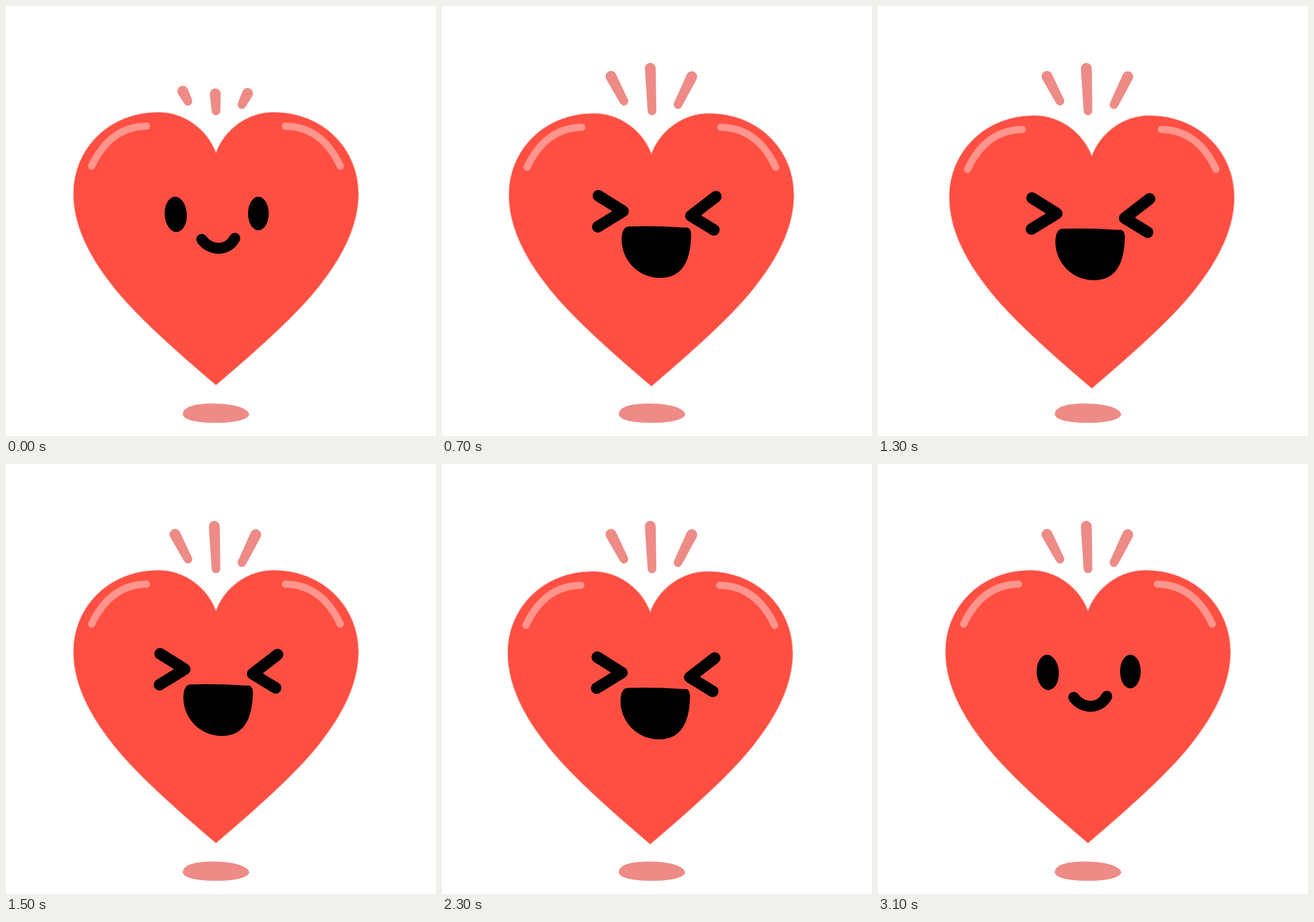
An HTML page with a canvas that plays this animation: 748 px wide and 748 px high, repeating every 3200 ms.

```html
<!DOCTYPE html>
<html lang="en">
<head>
<meta charset="utf-8">
<title>Laughing heart</title>
<style>
  html, body { margin: 0; width: 100%; height: 100%; overflow: hidden; background: #fff; }
  canvas { display: block; }
</style>
</head>
<body>
<canvas id="stage" width="748" height="748"></canvas>
<script>
const ctx = document.getElementById('stage').getContext('2d');
ctx.lineCap = ctx.lineJoin = 'round';

const STEP = 100, STEPS = 32;
const LAUGH_START = 3, LAUGH_END = 27, SHAKE_STEPS = 12;
const RED = '#ff4f42', PINK = '#ee8b86', SHINE = '#ff958c', EDGE = '#f5aaa4', BLACK = '#000';

// Left half, with a straight overlap past the axis to hide the seam
const halfHeart = new Path2D(`M365.2 257 C350 215 310 185.5 265 185.5 C180 185.5 118 248 118 327
  C118 385 150 440 181 480 C220 533 300 603 365.2 658.5 L380 600 L380 300 Z`);
const halfShine = new Path2D('M244.5 209 Q181 210 149 278.5');
const heart = mirrored(halfHeart);
const shines = mirrored(halfShine);
const smile = new Path2D('M340.5 406 C356 427 386 427 398 404');
const squint = new Path2D('M268 330 L311 357 L267 384 M472.5 331.5 L429 365 L469 389.5');
const laugh = new Path2D(`M308.5 406 Q309 384 321 383.5 Q365 382 418 385.5 Q429 383 429.5 398
  Q428 473 376 473 C336 473 308.5 441 308.5 406`);
const shadow = new Path2D(`M307.5 709 C310 696 330 691.5 362 691.5 C400 692 420 700 423 710
  C422 719 400 725 366 725 C330 725 307 720 307.5 709`);

function mirrored(half) {
  const whole = new Path2D(half);
  whole.addPath(half, new DOMMatrix([-1, 0, 0, 1, 730.5, 0]));
  return whole;
}

function fill(path, color) {
  ctx.fillStyle = color;
  // Halves are filled with opposite winding, so each gets its own pass
  ctx.fill(path);
}

function stroke(path, color, width) {
  ctx.strokeStyle = color;
  ctx.lineWidth = width;
  ctx.stroke(path);
}

function oval(x, y, rx, ry, tilt) {
  const path = new Path2D();
  path.ellipse(x, y, rx, ry, tilt, 0, 2 * Math.PI);
  fill(path, BLACK);
}

function ray(x, y, dx, dy, growth) {
  const tipRadius = 9.5, baseRadius = 7.5;
  const angle = Math.atan2(dy, dx);
  const spread = Math.acos((baseRadius - tipRadius) / (Math.hypot(dx, dy) * growth));
  const path = new Path2D();
  path.arc(x, y, baseRadius, angle + spread, angle - spread);
  path.arc(x + dx * growth, y + dy * growth, tipRadius, angle - spread, angle + spread);
  fill(path, PINK);
}

function drawRays(step) {
  const stage = 2 - Math.abs(step % 4 - 2);
  const growth = 0.4 + 0.6 * stage;
  ray(316.5, 165.5, -22.5, -43, growth);
  ray(365.3, 182.5, -3, -74, growth);
  ray(410.5, 171.5, 24, -48.5, growth);
}

function drawHeart() {
  stroke(heart, EDGE, 2.5);
  fill(halfHeart, RED);
  fill(mirrored(halfHeart), RED);
  ctx.save();
  ctx.translate(730.5, 0);
  ctx.scale(-1, 1);
  fill(halfHeart, RED);
  ctx.restore();
  stroke(shines, SHINE, 12.5);
}

function drawSmile() {
  oval(295.3, 362.5, 19.3, 30.7, -0.06);
  oval(439, 361, 18, 29.3, 0);
  stroke(smile, BLACK, 19);
}

function drawLaugh() {
  stroke(squint, BLACK, 20);
  fill(laugh, BLACK);
}

function shifted(x, y, draw) {
  ctx.save();
  ctx.translate(x, y);
  draw();
  ctx.restore();
}

function render() {
  const step = Math.floor(performance.now() / STEP) % STEPS;
  const laughing = step >= LAUGH_START && step < LAUGH_END;
  const shake = laughing ? (step - LAUGH_START) % SHAKE_STEPS / SHAKE_STEPS : 0;
  const phase = 2 * Math.PI * shake;
  const sway = (side, push) => side * Math.sin(phase) + push * (1 - Math.cos(phase));
  const jolt = shake * (1 - Math.cos(3 * phase));

  ctx.fillStyle = '#fff';
  ctx.fillRect(0, 0, 748, 748);
  fill(shadow, PINK);
  drawRays(step);
  shifted(sway(1.15, -1.33) + 5 * jolt, sway(0, 1.33) + 3 * jolt, drawHeart);
  shifted(sway(1.15, 2), sway(-3.46, 2), laughing ? drawLaugh : drawSmile);
  requestAnimationFrame(render);
}
render();
</script>
</body>
</html>
```
